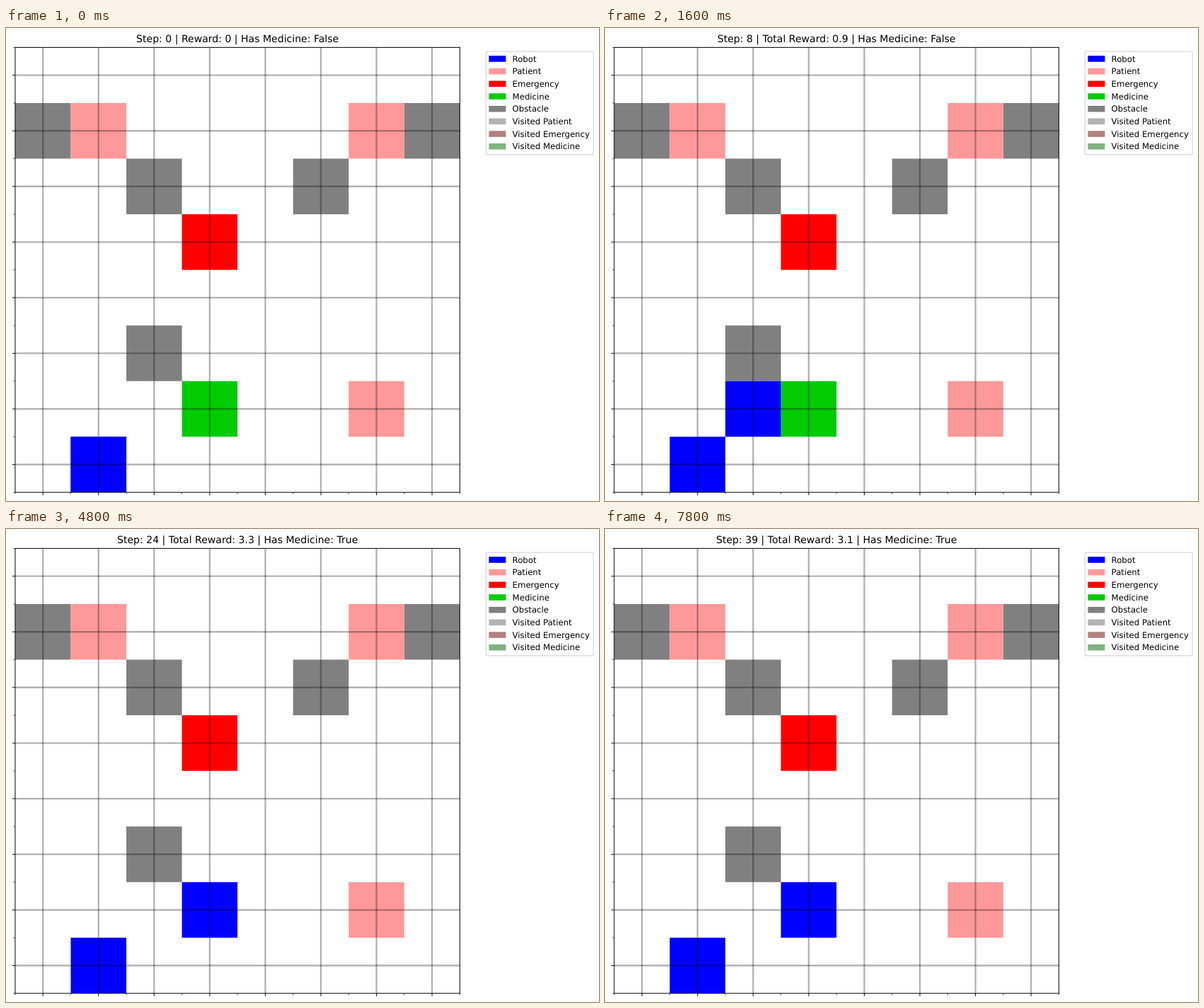
An HTML page with a canvas for the animation above (8 s loop, 838 px wide and 668 px high).

```html
<!DOCTYPE html>
<html lang="en">
<head>
<meta charset="utf-8">
<title>Robot grid</title>
<style>
html, body { margin: 0; width: 100%; height: 100%; overflow: hidden; background: #fff; }
canvas { display: block; }
</style>
</head>
<body>
<canvas id="stage" width="838" height="668"></canvas>
<script>
const ctx = document.getElementById('stage').getContext('2d');
const STEP_MS = 200, STEPS = 40;
const LEFT = 12.95, TOP = 27.4, CELL = 78.55, N = 8, SIZE = CELL * N;
const PT = 1.171; // pixels per point
const FONT = '"DejaVu Sans", sans-serif';

const ROBOT = '#0000ff', PATIENT = '#ff9999', EMERGENCY = '#ff0000',
      MEDICINE = '#00cc00', OBSTACLE = '#808080';

const LEGEND = [
  ['Robot', ROBOT], ['Patient', PATIENT], ['Emergency', EMERGENCY],
  ['Medicine', MEDICINE], ['Obstacle', OBSTACLE],
  ['Visited Patient', '#b3b3b3'], ['Visited Emergency', '#b38080'],
  ['Visited Medicine', '#80b380']
];

// [column, row, colour]
const CELLS = [
  [0, 1, OBSTACLE], [7, 1, OBSTACLE], [2, 2, OBSTACLE], [5, 2, OBSTACLE], [2, 5, OBSTACLE],
  [1, 1, PATIENT], [6, 1, PATIENT], [6, 6, PATIENT],
  [3, 3, EMERGENCY], [1, 7, ROBOT]
];

// Moves that reach a new cell, with their reward
const MOVES = {
  3: { pos: [1, 6], gain: 0.5 },
  5: { pos: [2, 6], gain: 0.5 },
  9: { pos: [3, 6], gain: 2.5, medicine: true }
};

function simulate() {
  const states = [{ pos: [1, 7], reward: 0, medicine: false }];
  for (let i = 1; i < STEPS; i++) {
    const last = states[i - 1], move = MOVES[i];
    states.push({
      pos: move ? move.pos : last.pos,
      reward: last.reward - 0.01 + (move ? move.gain : 0),
      medicine: last.medicine || !!(move && move.medicine)
    });
  }
  return states;
}

const states = simulate();

function fillCell(col, row, color) {
  ctx.fillStyle = color;
  ctx.fillRect(LEFT + col * CELL, TOP + row * CELL, CELL, CELL);
}

function line(x1, y1, x2, y2, width, color) {
  ctx.strokeStyle = color;
  ctx.lineWidth = width;
  ctx.beginPath();
  ctx.moveTo(x1, y1);
  ctx.lineTo(x2, y2);
  ctx.stroke();
}

function ticks(offset, length, width) {
  const x = LEFT + offset, y = TOP + offset;
  line(x, TOP + SIZE, x, TOP + SIZE + length, width, '#000');
  line(LEFT - length, y, LEFT, y, width, '#000');
}

function drawAxes() {
  for (let i = 0; i < N; i++) {
    const mid = (i + 0.5) * CELL;
    line(LEFT + mid, TOP, LEFT + mid, TOP + SIZE, 2 * PT, 'rgba(0,0,0,0.3)');
  }
  for (let i = 0; i < N; i++) {
    const mid = (i + 0.5) * CELL;
    line(LEFT, TOP + mid, LEFT + SIZE, TOP + mid, 2 * PT, 'rgba(0,0,0,0.3)');
    ticks(mid, 3.5 * PT, 0.8 * PT);
  }
  for (let i = 0; i <= N; i++) ticks(i * CELL, 2 * PT, 0.6 * PT);
  ctx.lineWidth = 1;
  ctx.strokeStyle = '#000';
  ctx.strokeRect(LEFT, TOP, SIZE, SIZE);
}

function drawLegend() {
  ctx.strokeStyle = '#d6d6d6';
  ctx.lineWidth = PT;
  ctx.beginPath();
  ctx.roundRect(678.3, 33.2, 151.8, 145.6, 2.3);
  ctx.stroke();
  ctx.font = `${10 * PT}px ${FONT}`;
  ctx.textAlign = 'left';
  LEGEND.forEach(([label, color], i) => {
    const y = 47.6 + i * 17.68;
    ctx.fillStyle = color;
    ctx.fillRect(682.4, y - 8.4, 24, 8.6);
    ctx.fillStyle = '#000';
    ctx.fillText(label, 715.6, y);
  });
}

function drawTitle(step, { reward, medicine }) {
  const score = step ? `Total Reward: ${reward.toFixed(1)}` : 'Reward: 0';
  ctx.font = `${12 * PT}px ${FONT}`;
  ctx.textAlign = 'center';
  ctx.fillStyle = '#000';
  ctx.fillText(`Step: ${step} | ${score} | Has Medicine: ${medicine ? 'True' : 'False'}`,
    LEFT + SIZE / 2, 20);
}

function draw(step) {
  const state = states[step];
  ctx.fillStyle = '#fff';
  ctx.fillRect(0, 0, 838, 668);
  CELLS.forEach(cell => fillCell(...cell));
  if (!state.medicine) fillCell(3, 6, MEDICINE);
  fillCell(...state.pos, ROBOT);
  drawAxes();
  drawLegend();
  drawTitle(step, state);
}

ctx.textRendering = 'geometricPrecision';
const start = performance.now();

function tick() {
  const elapsed = Math.max(0, performance.now() - start);
  draw(Math.floor(elapsed / STEP_MS) % STEPS);
  requestAnimationFrame(tick);
}
tick();
</script>
</body>
</html>
```
